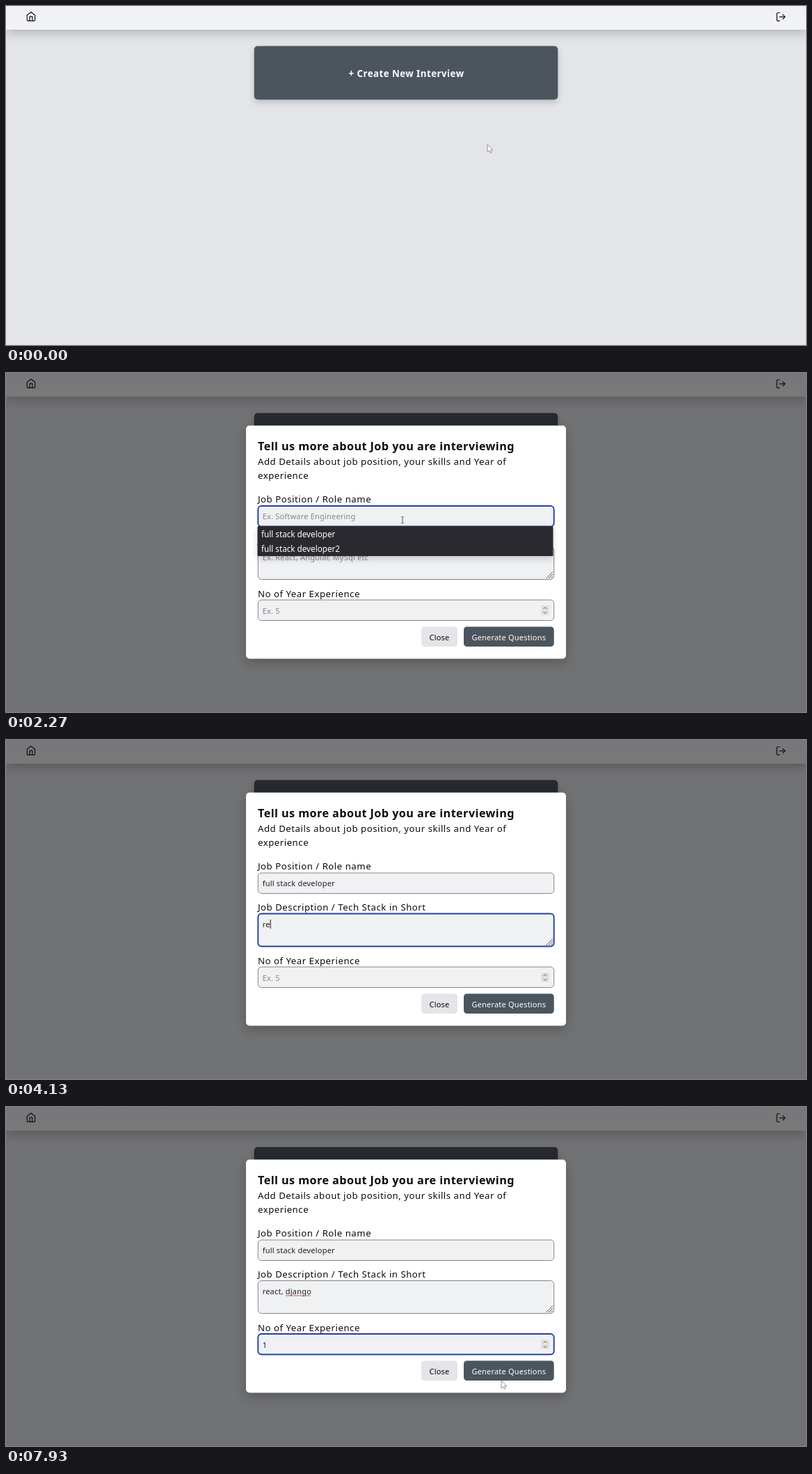
An HTML page that plays this animation: 1150x487 px, repeating every 8 s.

```html
<!DOCTYPE html>
<html lang="en">
<head>
<meta charset="utf-8">
<title>Create interview</title>
<style>
  html, body { margin: 0; width: 100%; height: 100%; overflow: hidden; background: #e4e5e9; }
  svg { display: block; width: 100%; height: 100%; }
  text { font-family: "Noto Sans", "Open Sans", sans-serif; white-space: pre; fill: #0b0b0d; }
  .title { font-size: 16.2px; font-weight: 700; letter-spacing: .43px; }
  .body { font-size: 13.2px; letter-spacing: .52px; }
  .small { font-size: 11px; letter-spacing: .2px; }
  .cta { font-size: 13.3px; font-weight: 700; letter-spacing: .47px; fill: #fff; }
  .item { font-size: 11.7px; fill: #fff; }
  .mid { text-anchor: middle; }
  .white { fill: #fff; }
  .icon { fill: none; stroke: #111; stroke-width: 1.9; stroke-linecap: round; stroke-linejoin: round; }
  .nav { filter: drop-shadow(0 5px 8px rgba(0, 0, 0, .22)); }
  .card { filter: drop-shadow(0 4px 5px rgba(0, 0, 0, .17)); }
  .modal { filter: drop-shadow(0 6px 8px rgba(0, 0, 0, .22)); }
  .line { fill: none; stroke: #55565a; stroke-width: 1; }
</style>
</head>
<body>
<svg viewBox="0 0 1150 487" preserveAspectRatio="none">
  <defs>
    <linearGradient id="navFill" x1="0" y1="0" x2="0" y2="1">
      <stop offset="0" stop-color="#eff0f3"/>
      <stop offset="1" stop-color="#f3f4f6"/>
    </linearGradient>
  </defs>
  <rect width="1150" height="487" fill="#e4e5e9"/>
  <rect class="nav" width="1150" height="34" fill="url(#navFill)"/>
  <g id="cta">
    <rect id="ctaBox" class="card" x="356.7" y="57.5" width="436.6" height="77" rx="5"/>
    <text id="ctaText" class="cta mid" x="575.5" y="102">+ Create New Interview</text>
  </g>
  <rect id="shade" width="1150" height="487" fill="#000" opacity=".5"/>
  <g class="icon" transform="translate(28.4 7.5) scale(.63)">
    <path d="M3 9l9-7 9 7v11a2 2 0 0 1-2 2H5a2 2 0 0 1-2-2zM9 22V12h6v10"/>
  </g>
  <g class="icon" transform="translate(1106.2 7.8) scale(.65)">
    <path d="M9 21H5a2 2 0 0 1-2-2V5a2 2 0 0 1 2-2h4M16 17l5-5-5-5M21 12H9"/>
  </g>

  <g id="modal">
    <rect class="modal" x="345" y="75.5" width="460" height="335" rx="5" fill="#fff"/>
    <text class="title" x="362" y="111">Tell us more about Job you are interviewing</text>
    <text class="body" x="362" y="132">Add Details about job position, your skills and Year of</text>
    <text class="body" x="362" y="151.5">experience</text>
    <text class="body" x="362" y="186">Job Position / Role name</text>
    <text class="body" x="362" y="245">Job Description / Tech Stack in Short</text>
    <text class="body" x="362" y="321.5">No of Year Experience</text>
    <g id="fields"></g>
    <path class="line" d="M776.5 295l9.5-9.5M780 295l6-6M783.5 295l2.5-2.5"/>
    <rect x="769" y="334" width="12" height="14" fill="#e2e2e3"/>
    <path class="line" d="M772.5 339l2.5-2.5 2.5 2.5M772.5 343l2.5 2.5 2.5-2.5"/>
    <path id="spell" fill="none" stroke="#b4524c" stroke-width=".9"/>
    <rect x="597" y="364.5" width="52" height="28.5" rx="4.5" fill="#e4e4e9"/>
    <text class="small mid" x="623" y="383.5">Close</text>
    <rect x="658" y="364.5" width="129.7" height="28.5" rx="4.5" fill="#4b555e"/>
    <text class="small mid white" x="722.8" y="383.5">Generate Questions</text>
    <rect id="caret" width="1" height="13" fill="#111"/>
    <g id="menu">
      <rect class="card" x="361.5" y="220" width="425" height="43" rx="1.5" fill="#2a2930"/>
      <rect id="row" x="361.5" width="425" height="21.5" fill="#4a4a51"/>
      <text class="item" x="367" y="235.5">full stack developer</text>
      <text class="item" x="367" y="256.5">full stack developer2</text>
    </g>
  </g>

  <g id="cursor">
    <path id="arrow" d="M0 0V11L2.6 8.7 4.3 12.3 6 11.5 4.5 8H8Z" fill="#fff" stroke="#77787c" stroke-width=".8" stroke-linejoin="round"/>
    <path id="beam" d="M-2-4.5H-.6L0-4 .6-4.5H2M0-4V4M-2 4.5H-.6L0 4 .6 4.5H2" fill="none" stroke="#4d5256" stroke-width=".9"/>
  </g>
</svg>
<script>
const LOOP = 8000;
const $ = id => document.getElementById(id);
const show = (el, on) => el.setAttribute('visibility', on ? 'inherit' : 'hidden');
const clamp = v => Math.max(0, Math.min(1, v));
const ease = v => v * v * (3 - 2 * v);
const mix = (a, b, k) => a + (b - a) * k;
const within = (t, a, b) => t >= a && t < b;

function make(tag, attrs, parent) {
  const el = document.createElementNS('http://www.w3.org/2000/svg', tag);
  for (const k in attrs) el.setAttribute(k, attrs[k]);
  return parent.appendChild(el);
}

// Keystrokes: [time, character]
const stack = [[4000, 'r'], [4070, 'e'], [4270, 'a'], [4470, 'c'], [4670, 't'], [5000, ','], [5130, ' '],
  [5270, 'd'], [5400, 'j'], [5530, 'a'], [5670, 'n'], [5870, 'g'], [6000, 'o']];
const fields = [
  { y: 191, h: 29.5, base: 210, hint: 'Ex. Software Engineering', focus: [1930, 3430], keys: [[2400, 'full stack developer']] },
  { y: 249.5, h: 47, base: 269, hint: 'Ex. React, Angular, MySql etc', focus: [3430, 7170], keys: stack },
  { y: 326, h: 29.5, base: 345.5, hint: 'Ex. 5', focus: [7170, LOOP], keys: [[7390, '1']] }
];
for (const f of fields) {
  f.box = make('rect', { x: 362.3, y: f.y, width: 425.4, height: f.h, rx: 5, fill: '#f0f1f3' }, $('fields'));
  f.text = make('text', { class: 'small', x: 368.7, y: f.base }, $('fields'));
}

let wave = 'M402 271';
for (let i = 0; i < 9; i++) wave += 'q1-1.6 2 0t2 0';
$('spell').setAttribute('d', wave);

// Pointer stops: [time, x, y]
const path = [[70, 692, 199], [600, 630, 115], [1450, 630, 115], [1900, 590, 206], [2200, 572, 206],
  [2450, 562, 232], [2720, 559, 254], [2950, 556, 232], [3050, 556, 232], [3400, 557, 291],
  [6800, 557, 291], [7150, 600, 342], [7600, 600, 342], [7930, 712, 393]];

function pointerAt(t) {
  let i = 0;
  while (i < path.length - 2 && t >= path[i + 1][0]) i++;
  const [t0, x0, y0] = path[i], [t1, x1, y1] = path[i + 1];
  const k = ease(clamp((t - t0) / (t1 - t0)));
  return [mix(x0, x1, k), mix(y0, y1, k)];
}

function drawField(f, t) {
  const focused = within(t, ...f.focus);
  const typed = f.keys.filter(k => k[0] <= t + 2);
  const value = typed.map(k => k[1]).join('');
  f.text.textContent = value || f.hint;
  f.text.style.fill = value ? '#1d1e21' : '#85868b';
  f.box.setAttribute('stroke', focused ? '#22439a' : '#85868a');
  f.box.setAttribute('stroke-width', focused ? 1.9 : 1);
  if (!focused) return;
  const last = typed.length ? typed[typed.length - 1][0] : f.focus[0];
  const x = 368.7 + (value ? f.text.getComputedTextLength() : 0);
  $('caret').setAttribute('x', x);
  $('caret').setAttribute('y', f.base - 11);
  show($('caret'), Math.floor((t - last) / 530) % 2 === 0 && !within(t, 2200, 3030));
}

function render(t) {
  const open = t >= 1065;
  const hover = open ? 0 : ease(clamp((t - 420) / 300));
  const [x, y] = pointerAt(t);
  const tone = [[76, 123], [85, 153], [94, 157]].map(([a, b]) => Math.round(mix(a, b, hover)));
  const s = 1 + .031 * hover;
  $('ctaBox').setAttribute('fill', `rgb(${tone})`);
  $('cta').setAttribute('transform', `translate(575 96.3) scale(${s}) translate(-575 -96.3)`);
  show($('shade'), open);
  show($('modal'), open);

  if (open) {
    show($('caret'), false);
    fields.forEach(f => drawField(f, t));
    show($('spell'), t >= 7170);
    show($('menu'), within(t, 2200, 3030));
    show($('row'), within(t, 2350, 3030));
    $('row').setAttribute('y', y > 241 ? 241.5 : 220);
  }

  const arrow = t < 450 || within(t, 2300, 3080) || t >= 7640;
  $('cursor').setAttribute('transform', `translate(${x} ${y})`);
  show($('cursor'), !within(t, 3990, 6790) && !within(t, 7380, 7630));
  show($('arrow'), arrow);
  show($('beam'), !arrow);
}

const start = performance.now();
function tick() {
  render((performance.now() - start) % LOOP);
  requestAnimationFrame(tick);
}
tick();
</script>
</body>
</html>
```
